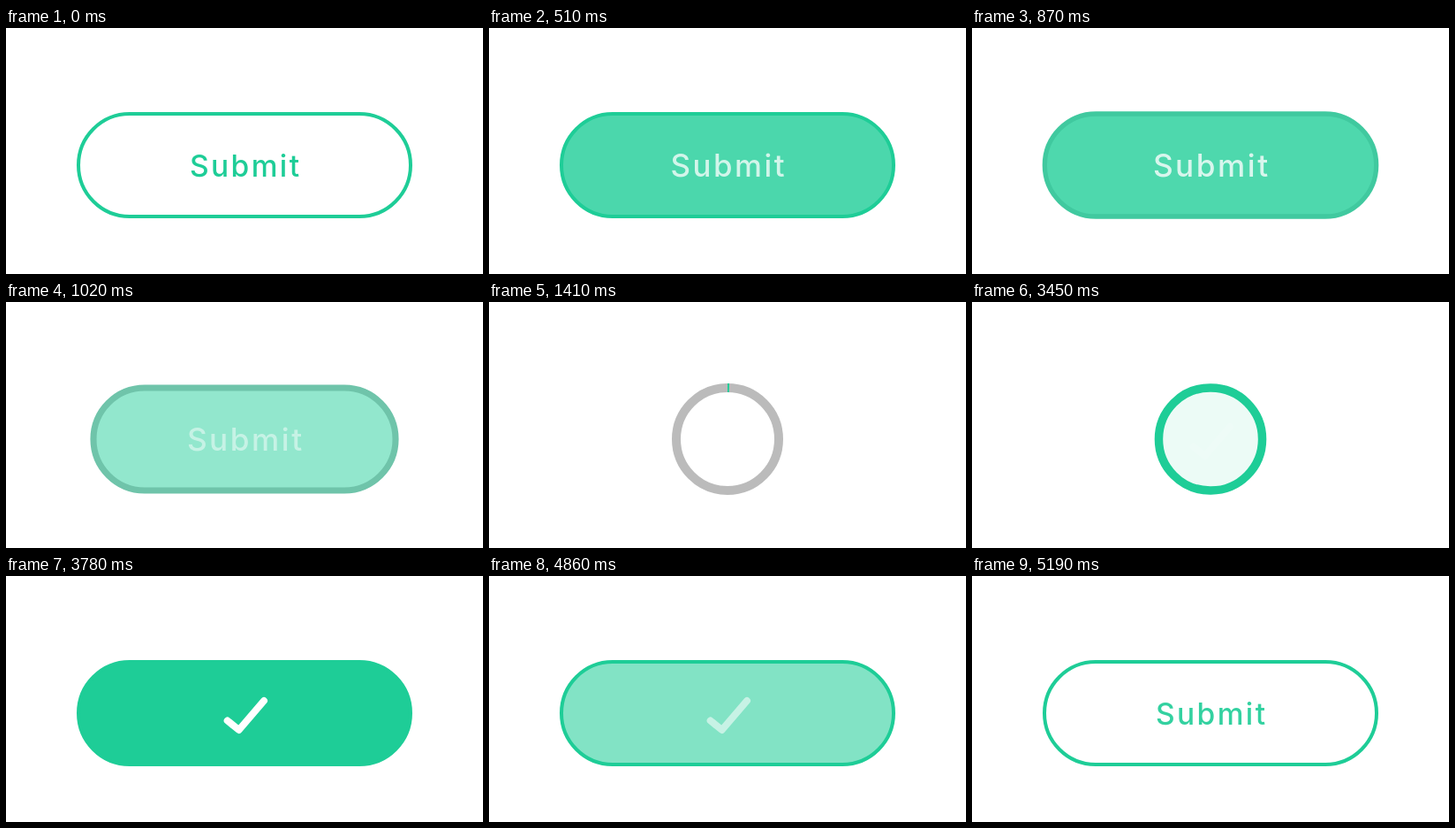
Write an HTML page that moves like this. It is 540 by 278 pixels and loops after 5220 ms.

```html
<!DOCTYPE html>
<html lang="en">
<head>
<meta charset="utf-8">
<title>Submit button</title>
<style>
  html, body { margin: 0; width: 100%; height: 100%; overflow: hidden; background: #fff; }
  svg { display: block; width: 540px; height: 278px; }
  text { font: 500 33.5px Inter, Lato, sans-serif; letter-spacing: 2.4px; text-anchor: middle; }
</style>
</head>
<body>
<svg viewBox="0 0 540 278">
  <rect id="pill" y="97" height="116" rx="58"/>
  <circle id="arc" cx="270" cy="155" r="58" fill="none" stroke="#1ecd97" stroke-width="10"
    pathLength="1" transform="rotate(-90 270 155)"/>
  <text id="label" x="1.2" y="12.5">Submit</text>
  <path id="check" d="M250.7 163.5L263.7 174L292 141" fill="none" stroke="#fff" stroke-width="8"
    stroke-linecap="round" stroke-linejoin="round"/>
</svg>
<script>
const LOOP = 5220;
const GREEN = [30, 205, 151], GREY = [187, 187, 187], WHITE = [255, 255, 255];
const [pill, arc, label, check] = ['pill', 'arc', 'label', 'check'].map(id => document.getElementById(id));

const mix = (a, b, p) => a + (b - a) * p;
const blend = (a, b, p) => `rgb(${a.map((v, i) => Math.round(mix(v, b[i], p)))})`;
const ramp = (t, from, to) => Math.min(1, Math.max(0, (t - from) / (to - from)));
const sine = p => (1 - Math.cos(Math.PI * p)) / 2;

// Cubic Bezier easing with flat ends: control points (x1, 0) and (x2, 1)
function bezier(p, x1, x2) {
  let lo = 0, hi = 1;
  for (let i = 0; i < 30; i++) {
    const s = (lo + hi) / 2, r = 1 - s;
    if (3 * r * r * s * x1 + 3 * r * s * s * x2 + s * s * s < p) lo = s; else hi = s;
  }
  return lo * lo * (3 - 2 * lo);
}

function set(el, attrs) {
  for (const name in attrs) el.setAttribute(name, attrs[name]);
}

function draw(t) {
  const hover = sine(ramp(t, 300, 600));
  const fade = ramp(t, 765, 1260);
  const shrink = bezier(ramp(t, 840, 1260), 0.9, 0.45);
  const load = bezier(ramp(t, 1180, 3400), 0.88, 0.09);
  const done = ramp(t, 3420, 3780);
  const grow = bezier(done, 0.8, 0.2);
  const clear = sine(ramp(t, 4740, 5000));
  const back = ramp(t, 5010, 5210);

  const width = mix(376, 116, shrink - grow);
  set(pill, {
    x: 270 - width / 2,
    width,
    fill: blend(WHITE, GREEN, hover - fade + done - clear),
    stroke: blend(GREEN, GREY, t < 3400 ? fade : 0),
    'stroke-width': mix(4, 10, fade - done)
  });
  set(arc, {
    'stroke-dasharray': `${load} 2`,
    visibility: t > 1260 && t < 3400 ? 'visible' : 'hidden'
  });

  const returning = t > 5000;
  set(label, {
    fill: blend(GREEN, WHITE, returning ? 0 : hover),
    opacity: returning ? back : 1 - fade,
    transform: `translate(270 155) scale(${returning ? 1 : 1 + 0.05 * hover})`
  });
  set(check, { opacity: done - clear });
}

function tick() {
  draw(performance.now() % LOOP);
  requestAnimationFrame(tick);
}
tick();
</script>
</body>
</html>
```
